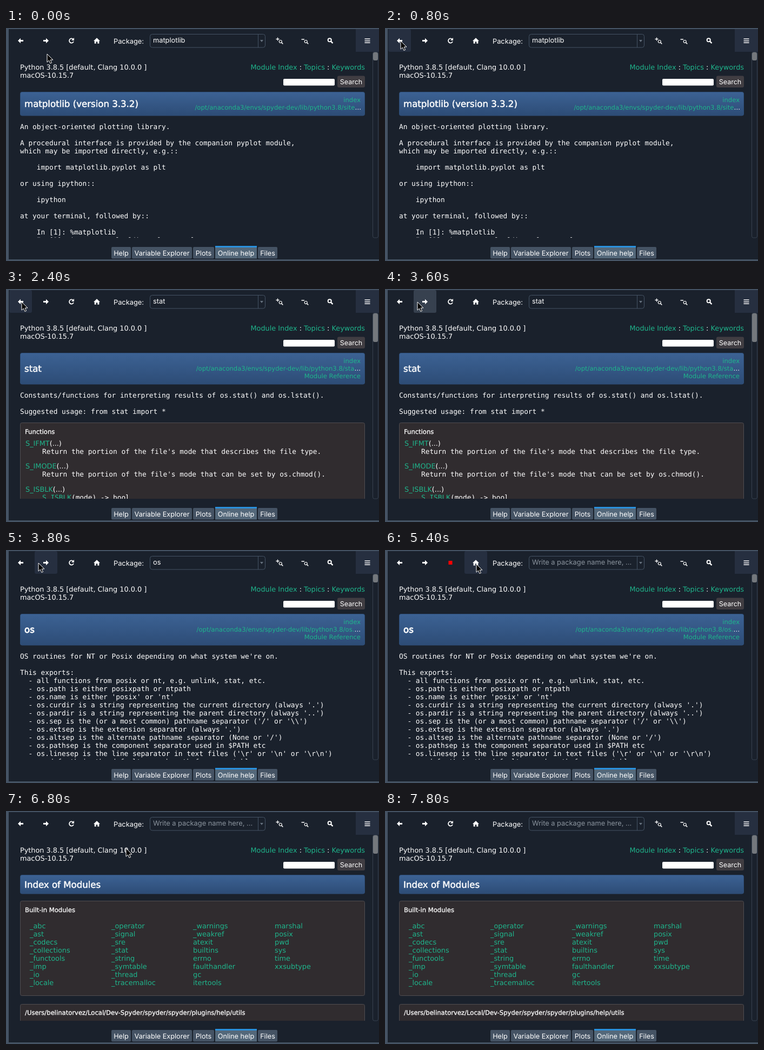
These frames come from a looping animation (690 px wide and 431 px high, 8 s). An HTML page:

```html
<!DOCTYPE html>
<html lang="en">
<head>
<meta charset="utf-8">
<title>Online help</title>
<style>
  html, body { margin: 0; width: 100%; height: 100%; overflow: hidden; background: #1a212c; }
  svg { display: block; width: 690px; height: 431px; }
  text { font: 12.83px "DejaVu Sans", sans-serif; fill: #fff; white-space: pre; text-rendering: geometricPrecision; }
  .ui { font: 12.8px Inter, sans-serif; }
  .tab { font-size: 12.7px; text-anchor: middle; }
  .mono { font: 12.8px "DejaVu Sans Mono", monospace; }
  .title { font-size: 16.6px; stroke: #fff; stroke-width: .5px; }
  .strong { font-size: 11.6px; stroke: #fff; stroke-width: .3px; }
  .small { font-size: 11.6px; }
  .end { text-anchor: end; }
  .link { fill: #1fb58c; }
  .plain { fill: #fff; }
  .hint { fill: #8b949e; }
  .band { fill: url(#blue); stroke: #2f4f79; }
  .card { fill: #302c2f; stroke: #504d50; }
  .thumb { fill: #74787d; }
  .hover { fill: #262f40; }
  .line { fill: none; stroke: #fff; stroke-width: 1.6; }

  .a { animation: 8s step-end infinite; }
  .mpl { animation-name: mpl; }
  .os { animation-name: os; }
  .os-name { animation-name: os-name; }
  .stat { animation-name: stat; }
  .home { animation-name: home; }
  .empty { animation-name: empty; }
  .busy { animation-name: busy; }
  .idle { animation-name: idle; }
  .on-back { animation-name: on-back; }
  .on-next { animation-name: on-next; }
  .press { animation-name: press; }
  .on-home { animation-name: on-home; }
  .cursor { animation-name: cursor; }
  @keyframes mpl { 0% { opacity: 1 } 12.5%, 100% { opacity: 0 } }
  @keyframes os { 0%, 27.5%, 70%, 100% { opacity: 0 } 12.5%, 47.5% { opacity: 1 } }
  @keyframes os-name { 0%, 27.5%, 67.5%, 100% { opacity: 0 } 12.5%, 47.5% { opacity: 1 } }
  @keyframes stat { 0%, 47.5%, 100% { opacity: 0 } 27.5% { opacity: 1 } }
  @keyframes home { 0% { opacity: 0 } 70%, 100% { opacity: 1 } }
  @keyframes empty { 0% { opacity: 0 } 67.5%, 100% { opacity: 1 } }
  @keyframes busy { 0%, 70%, 100% { opacity: 0 } 67.5% { opacity: 1 } }
  @keyframes idle { 0%, 70%, 100% { opacity: 1 } 67.5% { opacity: 0 } }
  @keyframes on-back { 0%, 35%, 100% { opacity: 0 } 7.5% { opacity: 1 } }
  @keyframes on-next { 0%, 62.5%, 100% { opacity: 0 } 35% { opacity: 1 } }
  @keyframes press { 0%, 47.5%, 100% { opacity: 0 } 45% { opacity: 1 } }
  @keyframes on-home { 0%, 80%, 100% { opacity: 0 } 65% { opacity: 1 } }
  @keyframes cursor {
    0% { transform: translate(76px, 48px); opacity: 1 }
    5% { transform: translate(60px, 40px) }
    7.5% { transform: translate(38px, 28px) }
    10% { transform: translate(29px, 24px) }
    32.5% { transform: translate(44px, 24px) }
    35% { transform: translate(60px, 24px) }
    62.5% { transform: translate(110px, 25px) }
    65% { transform: translate(169px, 26px) }
    80% { transform: translate(196px, 48px) }
    82.5% { transform: translate(211px, 60px) }
    85% { transform: translate(222px, 69px); opacity: 1 }
    95%, 100% { transform: translate(222px, 69px); opacity: 0 }
  }
</style>
</head>
<body>
<svg viewBox="0 0 690 431">
  <defs>
    <linearGradient id="blue" x2="0" y2="1">
      <stop stop-color="#3c6294"/>
      <stop offset="1" stop-color="#2d4c76"/>
    </linearGradient>
    <clipPath id="page"><rect x="5" y="44" width="685" height="344"/></clipPath>
    <path id="arrow" d="M-5 0L0-4.7V-1.4H5V1.4H0V4.7Z" fill="#fff"/>
    <g id="lens" class="line">
      <circle r="2.5" style="stroke-width:1.2"/>
      <path d="M1.800 1.800L4.500 4.500"/>
    </g>
  </defs>

  <rect width="690" height="431" fill="#455364"/>
  <rect x="5" y="2" width="685" height="426" fill="#1a212c"/>

  <!-- toolbar -->
  <rect class="hover" x="647" y="2" width="43" height="42"/>
  <rect class="a on-back hover" x="6" y="2" width="42" height="42" rx="3"/>
  <rect class="a on-next hover" x="53" y="2" width="42" height="42" rx="3"/>
  <rect class="a press" x="53" y="2" width="42" height="42" rx="3" fill="#37414f"/>
  <rect class="a on-home hover" x="147" y="2" width="42" height="42" rx="3"/>
  <use href="#arrow" x="27" y="23.5"/>
  <use href="#arrow" transform="translate(74 23.5) scale(-1 1)"/>
  <g class="a idle">
    <path class="line" style="stroke-width:1.8" d="M124.2 20.8A4.1 4.1 0 1 0 125 25"/>
    <path d="M126 18V23H121Z" fill="#fff"/>
  </g>
  <rect class="a busy" x="117.5" y="20" width="7" height="7" fill="#f00"/>
  <path d="M162 24L168 18.3L174 24H172.3V28.7H169.3V25.3H166.7V28.7H163.7V24Z" fill="#fff"/>
  <text class="ui" x="199" y="28.5">Package:</text>
  <rect x="266.5" y="11.5" width="213" height="24.5" rx="4" fill="none" stroke="#455364"/>
  <path d="M466.5 12V36" stroke="#455364"/>
  <path d="M470 22H476L473 26Z" fill="#66727f"/>
  <text class="ui a mpl" x="272" y="27">matplotlib</text>
  <text class="ui a os-name" x="272" y="27">os</text>
  <text class="ui a stat" x="272" y="27">stat</text>
  <text class="ui hint a empty" x="272" y="27">Write a package name here, ...</text>
  <path class="line" style="stroke-width:1.3" d="M499.5 20.5H505.500M502.5 17.5V23.5M546.5 21H552"/>
  <use href="#lens" x="507.8" y="25"/>
  <use href="#lens" x="554.7" y="25"/>
  <g class="line">
    <circle cx="598.7" cy="22.3" r="3.1" style="stroke-width:1.9"/>
    <path d="M601 24.6L604.5 28.1" style="stroke-width:2.2"/>
  </g>
  <path class="line" style="stroke-width:1.5" d="M663.5 20.2H673.5M663.5 23.7H673.5M663.5 27.2H673.5"/>

  <!-- scrollbar -->
  <rect x="678.5" y="44.5" width="10" height="343.5" rx="3" fill="#1a212c" stroke="#37414f"/>
  <rect class="thumb a mpl" x="679" y="45" width="9" height="15" rx="3"/>
  <rect class="thumb a os" x="679" y="45" width="9" height="15" rx="3"/>
  <rect class="thumb a stat" x="679" y="45" width="9" height="53" rx="3"/>
  <rect class="thumb a home" x="679" y="45" width="9" height="34" rx="3"/>

  <!-- page header -->
  <text x="26" y="77" class="lines">Python 3.8.5 [default, Clang 10.0.0 ]
macOS-10.15.7</text>
  <text x="664" y="77" class="end link">Module Index<tspan class="plain"> : </tspan>Topics<tspan class="plain"> : </tspan>Keywords</text>
  <rect x="513" y="94" width="95" height="12.5" rx="2" fill="#fff"/>
  <rect x="613" y="88.5" width="51" height="21.5" rx="3" fill="#403d42"/>
  <text class="ui" x="638.5" y="103.7" text-anchor="middle" style="font-size:12.5px">Search</text>

  <g clip-path="url(#page)">
    <g class="a mpl">
      <rect class="band" x="26.5" y="118.5" width="637" height="43.5" rx="3"/>
      <text class="title" x="34" y="145.5">matplotlib (version 3.3.2)</text>
      <text class="small end link" x="656" y="137">index</text>
      <text class="small end link" x="657" y="151">/opt/anaconda3/envs/spyder-dev/lib/python3.8/site<tspan class="plain">…</tspan></text>
      <text class="mono lines" x="26" y="187">An object-oriented plotting library.

A procedural interface is provided by the companion pyplot module,
which may be imported directly, e.g.::

    import matplotlib.pyplot as plt

or using ipython::

    ipython

at your terminal, followed by::

    In [1]: %matplotlib
    In [2]: import matplotlib.pyplot as plt</text>
    </g>

    <g class="a os">
      <rect class="band" x="26.5" y="118.5" width="637" height="57.5" rx="3"/>
      <text class="title" x="34" y="153" style="stroke-width:.9px">os</text>
      <text class="small end link" x="656" y="137">index</text>
      <text class="small end link" x="656" y="151">/opt/anaconda3/envs/spyder-dev/lib/python3.8/os.<tspan class="plain">…</tspan></text>
      <text class="small end link" x="656" y="165">Module Reference</text>
      <text class="mono lines" x="26" y="201">OS routines for NT or Posix depending on what system we're on.

This exports:
  - all functions from posix or nt, e.g. unlink, stat, etc.
  - os.path is either posixpath or ntpath
  - os.name is either 'posix' or 'nt'
  - os.curdir is a string representing the current directory (always '.')
  - os.pardir is a string representing the parent directory (always '..')
  - os.sep is the (or a most common) pathname separator ('/' or '\\')
  - os.extsep is the extension separator (always '.')
  - os.altsep is the alternate pathname separator (None or '/')
  - os.pathsep is the component separator used in $PATH etc
  - os.linesep is the line separator in text files ('\r' or '\n' or '\r\n')
  - os.defpath is the default search path for executables</text>
    </g>

    <g class="a stat">
      <rect class="band" x="26.5" y="118.5" width="637" height="57.5" rx="3"/>
      <text class="title" x="34" y="152.5">stat</text>
      <text class="small end link" x="656" y="137">index</text>
      <text class="small end link" x="656" y="151">/opt/anaconda3/envs/spyder-dev/lib/python3.8/sta<tspan class="plain">…</tspan></text>
      <text class="small end link" x="656" y="165">Module Reference</text>
      <text class="mono lines" x="26" y="201">Constants/functions for interpreting results of os.stat() and os.lstat().

Suggested usage: from stat import *</text>
      <rect class="card" x="26.5" y="247.5" width="637" height="160" rx="3"/>
      <text class="strong" x="35" y="267.5">Functions</text>
      <text class="link" x="36" y="290">S_IFMT<tspan class="plain">(...)</tspan></text>
      <text class="mono" x="67" y="305">Return the portion of the file's mode that describes the file type.</text>
      <text class="link" x="36" y="332">S_IMODE<tspan class="plain">(...)</tspan></text>
      <text class="mono" x="67" y="347">Return the portion of the file's mode that can be set by os.chmod().</text>
      <text class="link" x="36" y="375">S_ISBLK<tspan class="plain">(...)</tspan></text>
      <text class="mono link" x="67" y="390">S_ISBLK<tspan class="plain">(mode) -&gt; bool</tspan></text>
    </g>

    <g class="a home">
      <rect class="band" x="26.5" y="118.5" width="637" height="34.5" rx="3"/>
      <text class="title" x="34" y="141.5">Index of Modules</text>
      <rect class="card" x="26.5" y="166.5" width="637" height="175" rx="3"/>
      <text class="strong" x="35" y="186.5">Built-in Modules</text>
      <text class="link lines" x="44" y="217">_abc
_ast
_codecs
_collections
_functools
_imp
_io
_locale</text>
      <text class="link lines" x="195" y="217">_operator
_signal
_sre
_stat
_string
_symtable
_thread
_tracemalloc</text>
      <text class="link lines" x="346" y="217">_warnings
_weakref
atexit
builtins
errno
faulthandler
gc
itertools</text>
      <text class="link lines" x="497" y="217">marshal
posix
pwd
sys
time
xxsubtype</text>
      <rect class="card" x="26.5" y="357.5" width="637" height="60" rx="3"/>
      <text class="strong" x="35" y="377">/Users/belinatorvez/Local/Dev-Spyder/spyder/spyder/plugins/help/utils</text>
    </g>
  </g>

  <!-- tabs -->
  <g fill="#455364">
    <rect x="195" y="405" width="36" height="21.5" rx="2"/>
    <rect x="233" y="405" width="111" height="21.5" rx="2"/>
    <rect x="346" y="405" width="39" height="21.5" rx="2"/>
    <rect x="466" y="405" width="36" height="21.5" rx="2"/>
    <rect x="387" y="403" width="77" height="23.5" fill="#54687a"/>
    <rect x="387" y="403" width="77" height="3" fill="#2a90dc"/>
  </g>
  <text class="ui tab" x="213" y="420.5">Help</text>
  <text class="ui tab" x="288.5" y="420.5">Variable Explorer</text>
  <text class="ui tab" x="365.5" y="420.5">Plots</text>
  <text class="ui tab" x="425.5" y="420.5">Online help</text>
  <text class="ui tab" x="484" y="420.5">Files</text>

  <path class="a cursor" d="M0 0V15.2L3.5 12L5.9 17.5L8.500 16.400L6.200 11H11Z" fill="#000" stroke="#fff" stroke-linejoin="round"/>
</svg>
<script>
  // Break multi-line text into rows 15px apart.
  for (const el of document.querySelectorAll(".lines")) {
    const x = el.getAttribute("x"), y = +el.getAttribute("y");
    const rows = el.textContent.split("\n");
    el.textContent = "";
    rows.forEach((row, i) => {
      const span = document.createElementNS(el.namespaceURI, "tspan");
      span.setAttribute("x", x);
      span.setAttribute("y", y + i * 15);
      span.textContent = row;
      el.append(span);
    });
  }
</script>
</body>
</html>
```
